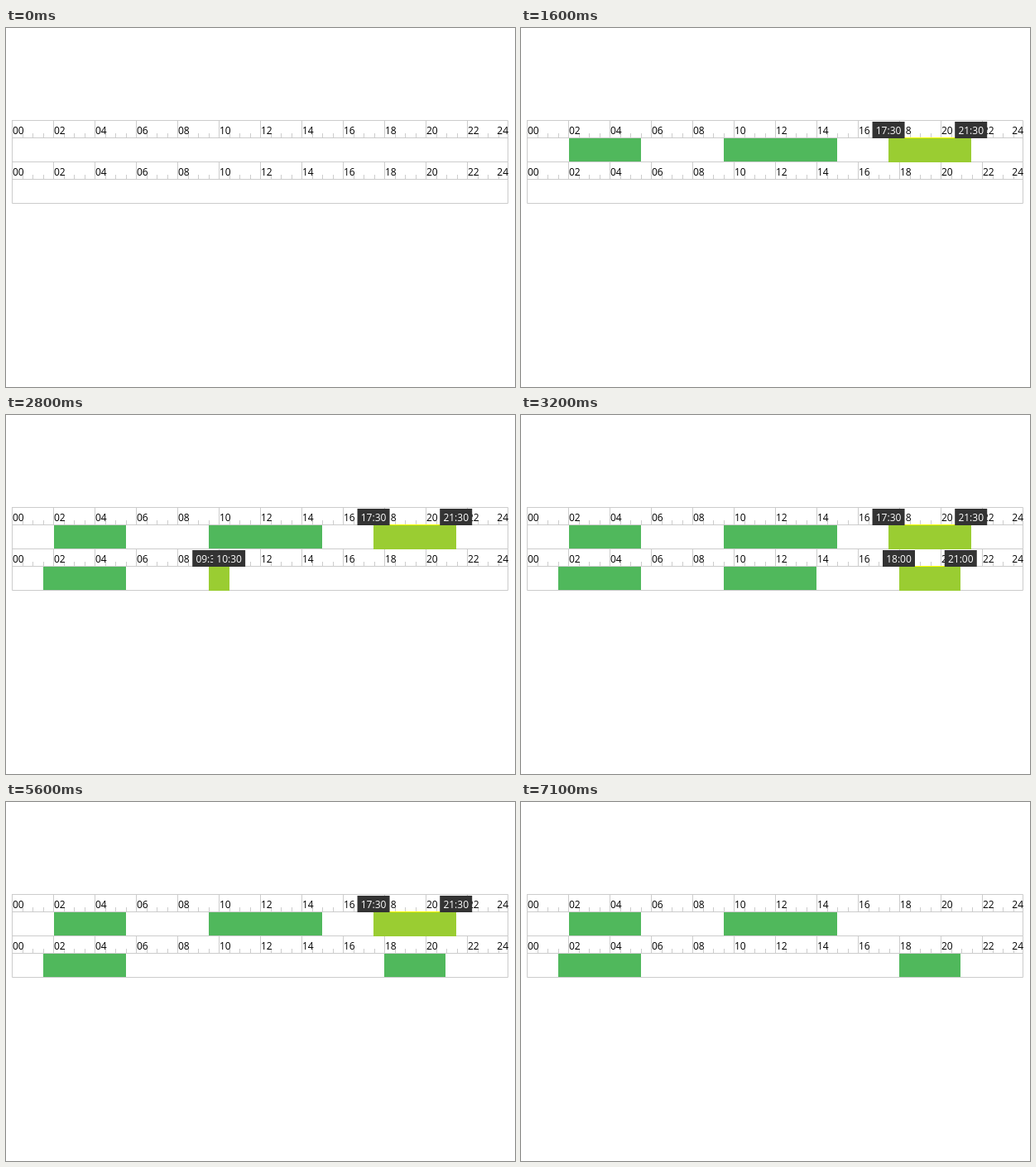
These frames come from a looping animation (615 px wide and 433 px high, 8 s). An HTML page:

```html
<!DOCTYPE html>
<html lang="en">
<head>
<meta charset="utf-8">
<title>Time range picker</title>
<style>
  html, body { margin: 0; width: 100%; height: 100%; overflow: hidden; background: #fff; }
  svg { display: block; width: 615px; height: 433px; }
  text { font: 12px "Open Sans", "Noto Sans CJK SC", sans-serif; }
  .tip text { font-weight: 500; fill: #fff; text-anchor: middle; }
  .popup text { text-anchor: middle; fill: #333; }
  .popup .light { fill: #fff; }
  .line { fill: none; stroke: #ccc; }
</style>
</head>
<body>
<svg viewBox="0 0 615 433">
  <g id="rulers"></g>
  <g id="ranges"></g>
</svg>
<script>
const LOOP = 8000;
const TICK = 100;
const GREEN = "#50b85c", LIME = "#9acd32";

// Ranges are drawn one after another, then the edited one is picked, opened and removed.
const ROWS = [
  { top: 111, begin: 600, gap: 400, drag: 200, spans: [[2, 5.5], [9.5, 15], [17.5, 21.5]],
    edited: 2, pick: 6400, open: 6400, remove: 7100 },
  { top: 161, begin: 2500, gap: 300, drag: 100, spans: [[1.5, 5.5], [9.5, 14], [18, 21]],
    edited: 1, pick: 4400, open: 4800, remove: 5600 }
];

const toX = hour => 8 + hour * 598 / 24;
const pad = n => String(n).padStart(2, "0");
const clock = hour => `${pad(Math.floor(hour))}:${pad(hour % 1 * 60)}`;
const rect = (x, y, w, h, fill, extra = "") =>
  `<rect x="${x}" y="${y}" width="${w}" height="${h}" fill="${fill}" ${extra}/>`;
const label = (x, y, text, extra = "") => `<text x="${x}" y="${y}" ${extra}>${text}</text>`;

function ruler({ top }) {
  let path = `M7.5 ${top + .5}H606.5V${top + 50.5}H7.5ZM7 ${top + 21.5}H607`;
  let texts = label(607, top + 17, "24", 'text-anchor="end"');
  for (let i = 0; i < 48; i++) {
    const x = Math.round(7 + i * 12.5);
    const isHour = i % 4 === 0;
    path += `M${x + .5} ${top + (isHour ? 0 : 16)}V${top + 21}`;
    if (isHour) texts += label(x + 1, top + 17, pad(i / 2));
  }
  return `<path class="line" d="${path}"/>${texts}`;
}

function tip(hour, top) {
  const x = toX(hour);
  return `<g class="tip">${rect(x - 19.5, top + 2, 39, 20, "#333")}${label(x, top + 17, clock(hour))}</g>`;
}

function bar([start, end], top, active) {
  const x = Math.round(toX(start)), width = Math.round(toX(end)) - x;
  return active
    ? rect(x, top + 21, width, 30, LIME) + rect(x, top + 21, width, 1, "#ff0")
    : rect(x, top + 22, width, 28, GREEN);
}

function popup([start, end], top) {
  const left = Math.floor(toX((start + end) / 2)) - 88;
  const field = (x, hour) =>
    rect(x + .5, 14.5, 62, 25, "#fff", 'stroke="#ccc" rx="2"') + label(x + 31.5, 31, clock(hour));
  const button = (x, text, fill) =>
    rect(x, 57, 63, 26, fill, 'rx="2"') + label(x + 31.5, 74, text, 'class="light"');
  return `<g class="popup" transform="translate(${left} ${top - 109})">
    <path d="M.5 .5H175.5V99.5H97L88 108.5L79 99.5H.5Z" fill="#fff" stroke="#ccc"/>
    ${field(15, start)}${label(88, 31, "-")}${field(98, end)}
    ${button(15, "删除", "#999")}${button(98, "保存", GREEN)}</g>`;
}

// A drag starts at a quarter of its length and snaps to half hours.
function spanAt([start, end], elapsed, drag) {
  const progress = .25 + .75 * Math.min(1, elapsed / drag);
  return [start, start + Math.round((end - start) * progress * 2) / 2];
}

function drawRow(row, time) {
  const { top, begin, gap, drag, spans, edited, pick, remove } = row;
  const removed = time >= remove;
  const latest = Math.min(spans.length - 1, Math.floor((time - begin) / gap));
  const selected = removed ? -1 : time >= pick ? edited : latest;
  let bars = "", tips = "";
  spans.slice(0, latest + 1).forEach((span, i) => {
    if (removed && i === edited) return;
    const current = spanAt(span, time - begin - i * gap, drag);
    bars += bar(current, top, i === selected);
    if (i === selected) tips = current.map(hour => tip(hour, top)).join("");
  });
  return bars + tips;
}

function render(time) {
  const popups = ROWS.filter(row => time >= row.open && time < row.remove)
    .map(row => popup(row.spans[row.edited], row.top));
  return ROWS.map(row => drawRow(row, time)).concat(popups).join("");
}

document.getElementById("rulers").innerHTML = ROWS.map(ruler).join("");
const layer = document.getElementById("ranges");
const origin = performance.now();
let shown = -1;

function frame(now) {
  const time = Math.floor(Math.max(0, now - origin) % LOOP / TICK) * TICK;
  if (time !== shown) {
    layer.innerHTML = render(time);
    shown = time;
  }
  requestAnimationFrame(frame);
}
requestAnimationFrame(frame);
</script>
</body>
</html>
```
